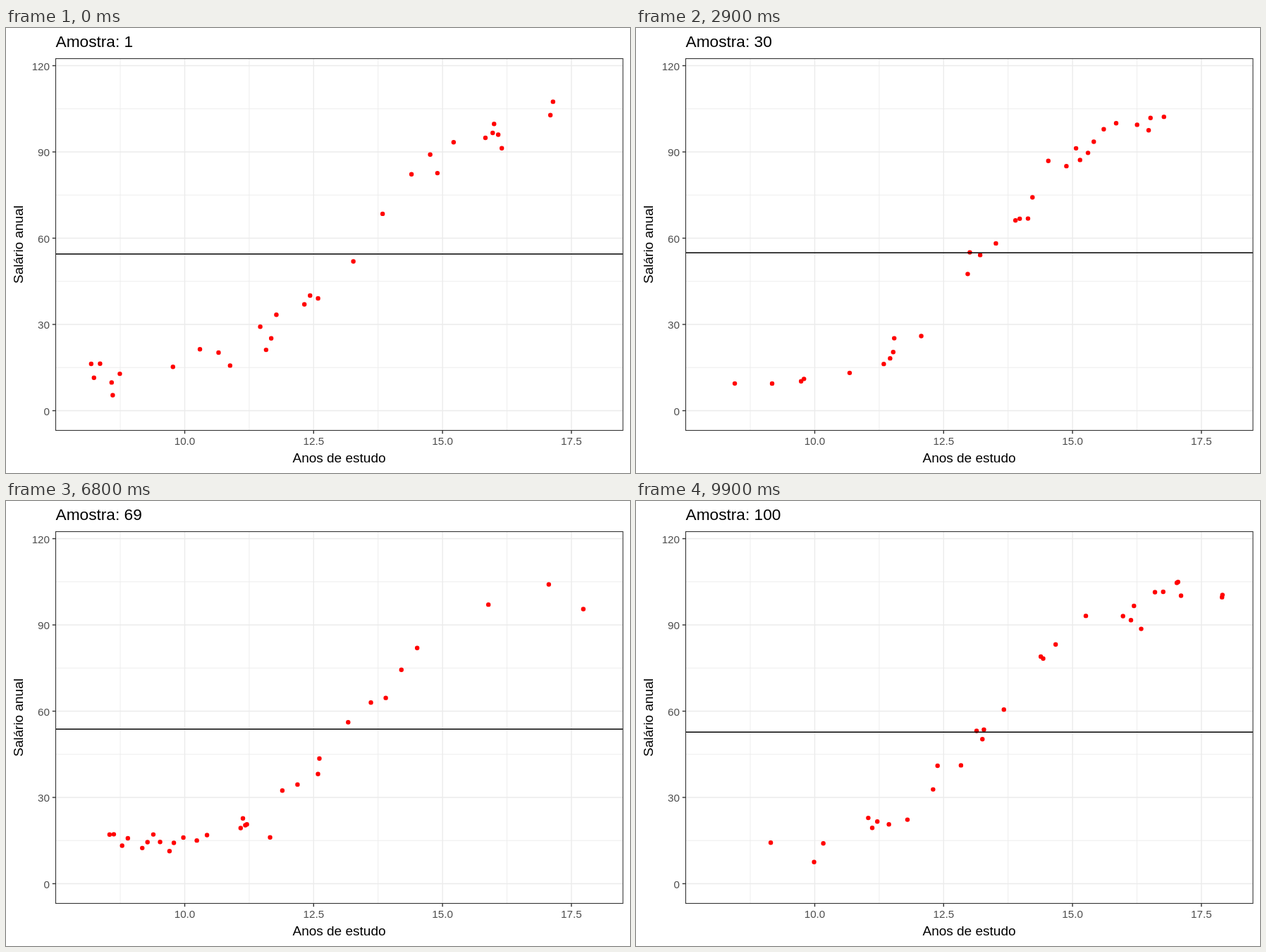
Recreate the animation shown at these times as an HTML page. Size 885 by 632 pixels, loop 10000 ms.

```html
<!DOCTYPE html>
<html lang="pt">
<head>
<meta charset="utf-8">
<title>Amostras</title>
<style>
  html, body { margin: 0; width: 100%; height: 100%; overflow: hidden; background: #fff; }
  svg { display: block; width: 885px; height: 632px; }
  text { font-family: "Liberation Sans", Arial, sans-serif; font-size: 19px; }
  .tick { font-size: 15.2px; fill: #4d4d4d; }
  .title { font-size: 22.7px; }
</style>
</head>
<body>
<svg id="chart" viewBox="0 0 885 632"></svg>
<script>
const SAMPLES = 100, SIZE = 30, STEP_MS = 100;
const LEFT = 70.5, RIGHT = 875, TOP = 43.5, BOTTOM = 571.5;
const chart = document.getElementById("chart");

const px = years => 253.5 + (years - 10) * 73.12;
const py = salary => 543.5 - salary * 4.0833;

function add(tag, attrs, text) {
  const node = document.createElementNS("http://www.w3.org/2000/svg", tag);
  for (const key in attrs) node.setAttribute(key, attrs[key]);
  if (text !== undefined) node.textContent = text;
  return chart.appendChild(node);
}

function line(x1, y1, x2, y2, stroke, width) {
  return add("line", { x1, y1, x2, y2, stroke, "stroke-width": width });
}

const gridX = (years, width) => line(px(years), TOP, px(years), BOTTOM, "#ebebeb", width);
const gridY = (salary, width) => line(LEFT, py(salary), RIGHT, py(salary), "#ebebeb", width);

// Running mean salary at a few samples; the ones between are interpolated.
const meanStops = [
  [1, 54.5], [19, 54.6], [30, 54.9], [45, 56.7], [59, 54.55], [79, 53], [100, 52.7]
];

function meanSalary(n) {
  const i = Math.max(1, meanStops.findIndex(([stop]) => stop >= n));
  const [n0, m0] = meanStops[i - 1], [n1, m1] = meanStops[i];
  return m0 + (m1 - m0) * (n - n0) / (n1 - n0);
}

function random(seed) {
  return () => {
    seed = (seed + 0x6D2B79F5) | 0;
    let r = Math.imul(seed ^ (seed >>> 15), 1 | seed);
    r = (r + Math.imul(r ^ (r >>> 7), 61 | r)) ^ r;
    return ((r ^ (r >>> 14)) >>> 0) / 4294967296;
  };
}

// Years are uniform; salary follows a logistic curve with normal noise.
function drawSample(n) {
  const next = random(n * 7919);
  return Array.from({ length: SIZE }, () => {
    const years = 8 + 10 * next();
    const noise = Math.sqrt(-2 * Math.log(1 - next())) * Math.cos(2 * Math.PI * next());
    const salary = 12 + 90 / (1 + Math.exp(-1.05 * (years - 13.36))) + 3.8 * noise;
    return { years, salary };
  });
}

for (let v = 15; v < 120; v += 30) gridY(v, 0.9);
for (let v = 8.75; v < 17.5; v += 2.5) gridX(v, 0.9);
for (let v = 0; v <= 120; v += 30) {
  gridY(v, 1.4);
  line(LEFT - 4.7, py(v), LEFT, py(v), "#333", 1.4);
  add("text", { x: 62, y: py(v) + 6, class: "tick", "text-anchor": "end" }, v);
}
for (let v = 10; v <= 17.5; v += 2.5) {
  gridX(v, 1.4);
  line(px(v), BOTTOM, px(v), BOTTOM + 4.7, "#333", 1.4);
  add("text", { x: px(v), y: 592, class: "tick", "text-anchor": "middle" }, v.toFixed(1));
}

const dots = Array.from({ length: SIZE }, () => add("circle", { r: 3.2, fill: "#f00" }));
const meanLine = line(LEFT, 0, RIGHT, 0, "#000", 1.5);
add("rect", {
  x: LEFT, y: TOP, width: RIGHT - LEFT, height: BOTTOM - TOP,
  fill: "none", stroke: "#333", "stroke-width": 1.1
});
const title = add("text", { x: 70.5, y: 27, class: "title" });
add("text", { x: 472.5, y: 617, "text-anchor": "middle" }, "Anos de estudo");
add("text", { transform: "translate(24 307.5) rotate(-90)", "text-anchor": "middle" }, "Salário anual");

let shown = 0;
function render(ms) {
  const n = Math.floor(ms / STEP_MS) % SAMPLES + 1;
  if (n === shown) return;
  shown = n;
  title.textContent = "Amostra: " + n;
  drawSample(n).forEach(({ years, salary }, i) => {
    dots[i].setAttribute("cx", px(years));
    dots[i].setAttribute("cy", py(salary));
  });
  const y = py(meanSalary(n));
  meanLine.setAttribute("y1", y);
  meanLine.setAttribute("y2", y);
}

const start = performance.now();
function tick() {
  render(performance.now() - start);
  requestAnimationFrame(tick);
}
tick();
</script>
</body>
</html>
```
